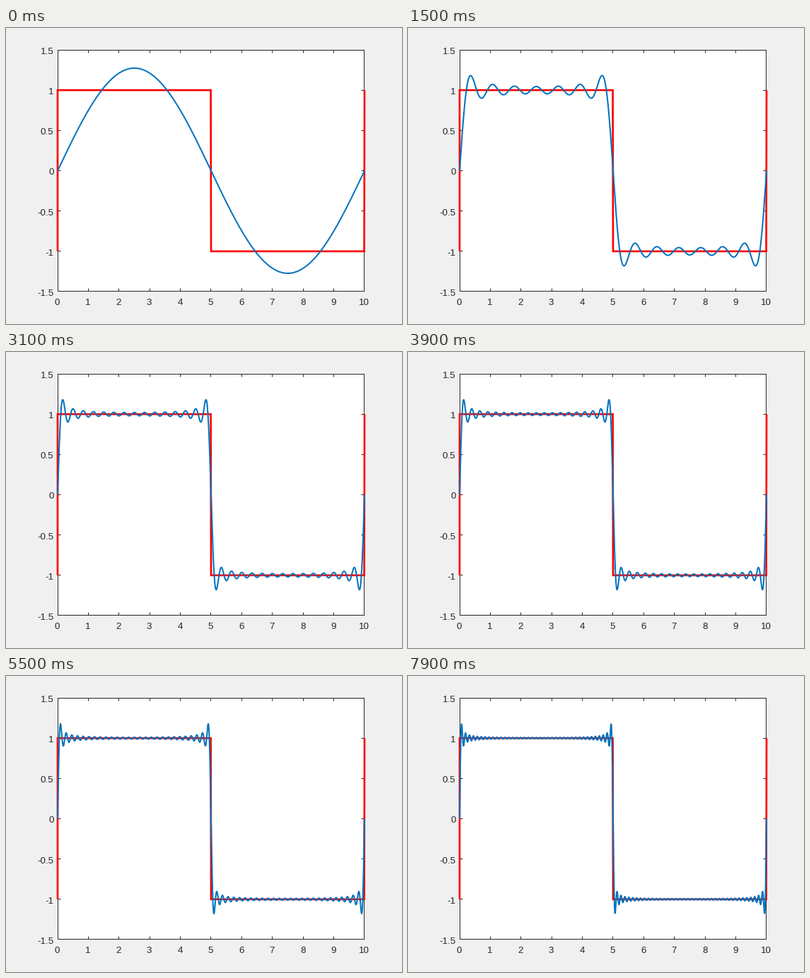
A matplotlib script for the animation above (8 s loop, 560x420 px).

```python
import numpy as np
import matplotlib.pyplot as plt
from matplotlib.animation import FuncAnimation

W, H, DPI = 560, 420, 100
PX = 72 / DPI                     # one pixel in points
LEFT, TOP, AX_W, AX_H = 73, 31, 434, 343
INK = (0.15, 0.15, 0.15)
PERIOD = 10
STEP_MS, FIRST_MS, FRAME_MS, LOOP_MS = 200, 500, 100, 8000
Y_TICKS = np.arange(-1.5, 1.6, 0.5)

plt.rcParams["font.family"] = "Liberation Sans"
plt.rcParams["toolbar"] = "None"

fig = plt.figure(figsize=(W / DPI, H / DPI), dpi=DPI, facecolor="#f0f0f0")


def add_axes(left, top, width, height):
    axes = fig.add_axes([left / W, 1 - (top + height) / H,
                         width / W, height / H])
    axes.set(xlim=(0, PERIOD), ylim=(-1.5, 1.5), facecolor="white")
    return axes


# Box and ticks sit just inside the data area so that they snap to its pixels
frame_ax = add_axes(LEFT - 0.45, TOP - 0.45, AX_W - 0.1, AX_H - 0.1)
frame_ax.set_xticks(np.arange(PERIOD + 1))
frame_ax.set_yticks(Y_TICKS)
frame_ax.tick_params(direction="in", top=True, right=True, length=4.34 * PX,
                     width=PX, color=INK, labelbottom=False, labelleft=False)
for spine in frame_ax.spines.values():
    spine.set(linewidth=PX, edgecolor=INK)

ax = add_axes(LEFT, TOP, AX_W, AX_H)
ax.axis("off")


def label(x, y, value, align):
    fig.text(x / W, 1 - y / H, f"{value:g}", ha=align, va="baseline",
             fontsize=13.33 * PX, color=INK)


for v in range(PERIOD + 1):
    label(LEFT - 0.5 + v / PERIOD * AX_W, 393, v, "center")
for v in Y_TICKS:
    label(67.5, TOP + (1.5 - v) / 3 * AX_H + 5.9, v, "right")

# Ideal square wave
ax.plot([0, 0, 4.99, 5, 9.99, 10], [-1, 1, 1, -1, -1, 1], color="red",
        lw=2.67 * PX, solid_joinstyle="miter", solid_capstyle="butt",
        clip_on=False)

x = np.linspace(0, PERIOD, 1001)
curve, = ax.plot([], [], color="#0072bd", lw=2 * PX, clip_on=False,
                 solid_capstyle="butt", zorder=4)


def partial_sum(terms):
    k = 2 * np.arange(terms)[:, None] + 1
    return 4 / np.pi * (np.sin(2 * np.pi * k * x / PERIOD) / k).sum(axis=0)


def update(frame):
    t = frame * FRAME_MS
    terms = 1 if t < FIRST_MS else 2 + (t - FIRST_MS) // STEP_MS
    curve.set_data(x, partial_sum(terms))
    return curve,


anim = FuncAnimation(fig, update, frames=LOOP_MS // FRAME_MS,
                     interval=FRAME_MS, repeat=True, repeat_delay=0)
plt.show()
```
